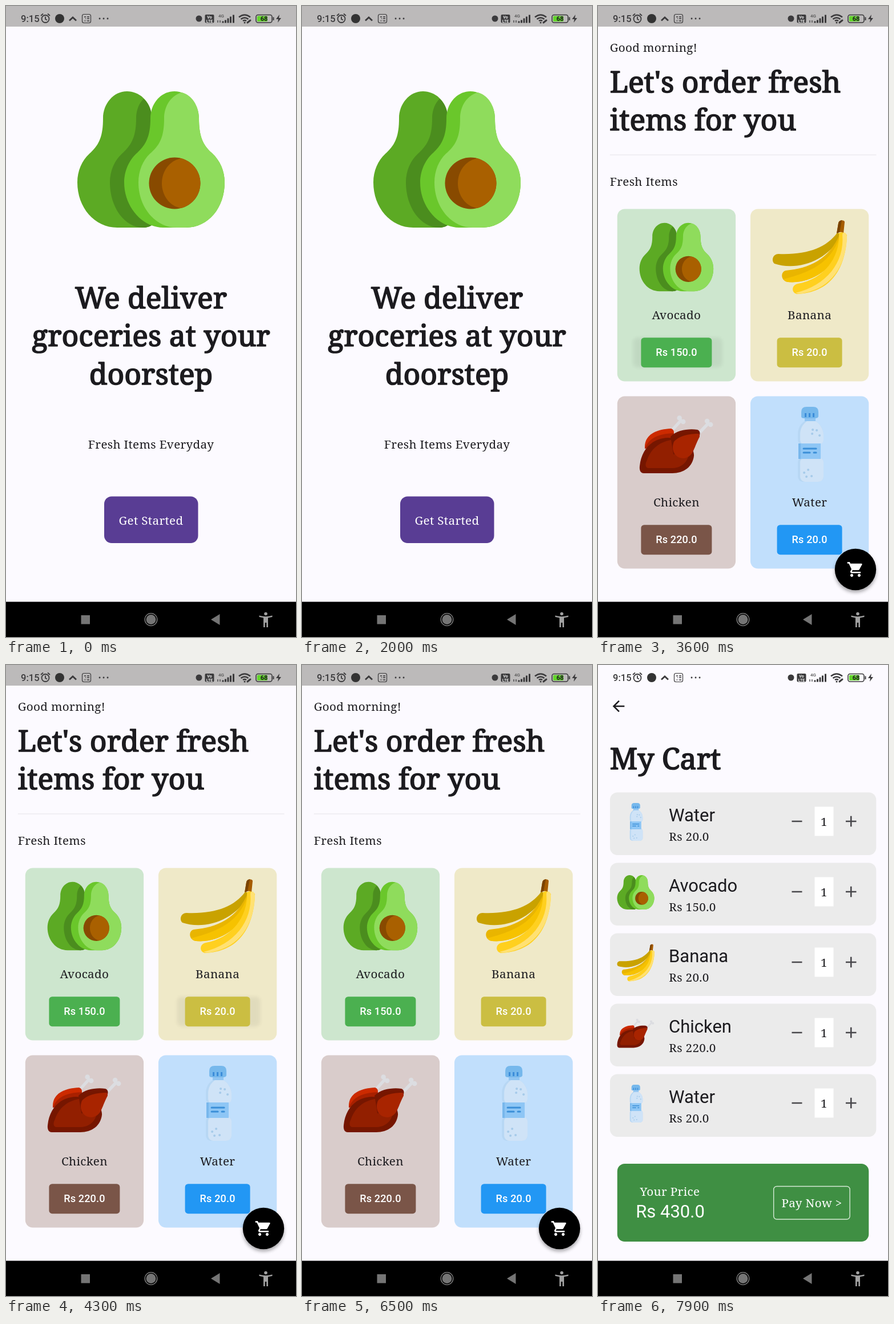
An HTML page that plays this animation: 508 by 1102 pixels, repeating every 8 s.

```html
<!DOCTYPE html>
<html lang="en">
<head>
<meta charset="utf-8">
<title>Grocery app</title>
<style>
  html, body { margin: 0; width: 100%; height: 100%; overflow: hidden; background: #fcfaff; }
  svg { display: block; width: 508px; height: 1102px; }
  text { fill: #1c1b1f; white-space: pre; }
  .head { font: 51.7px "Noto Serif", serif; stroke: #1c1b1f; stroke-width: 1.7; stroke-linejoin: round; }
  .body { font: 20.68px "Noto Serif", serif; letter-spacing: .32px; }
  .name { font: 31px Roboto, sans-serif; }
  .price { font: 500 18.1px Roboto, sans-serif; letter-spacing: .13px; }
  .tiny { font: 500 8px Roboto, sans-serif; }
  .light { fill: #fff; }
  .mid { text-anchor: middle; }
</style>
</head>
<body>
<svg id="stage" viewBox="0 0 508 1102">
  <defs>
    <filter id="soft" x="-20%" y="-20%" width="140%" height="140%"><feGaussianBlur stdDeviation="3"/></filter>

    <g id="avocado" transform="scale(.502) translate(-254 -268)">
      <path fill="#5caa24" d="M212 149C188 149 170 171 170 196C170 228 163 243 146 258C133 270 125 288 125 308C125 352 155 387 195 387H240C247 387 252 385 255 383V190C252 165 233 149 212 149Z"/>
      <path fill="#4b8d1e" d="M241 162C233 170 228 182 228 196C228 228 220 243 203 258C190 270 182 288 182 308C182 352 208 387 240 387C247 387 252 385 255 383V190C254 178 248 168 241 162Z"/>
      <path fill="#6ac72b" d="M295 149C271 149 253 171 253 196C253 228 245 243 228 258C216 269 207 288 207 308C207 352 240 387 275 387H315C355 387 383 352 383 308C383 288 375 270 361 257C345 243 338 228 338 196C338 171 319 149 295 149Z"/>
      <path fill="#8fdc5c" d="M308 151C289 156 277 175 277 196C277 228 270 243 252 258C240 269 232 288 232 308C232 352 262 387 299 387H315C355 387 383 352 383 308C383 288 375 270 361 257C345 243 338 228 338 196C338 174 325 155 308 151Z"/>
      <circle cx="295.5" cy="309.5" r="45" fill="#884a00"/>
      <path fill="#a96000" d="M307 266A45 45 0 0 1 307 353C286 350 273 330 273 309.5C273 289 286 270 307 266Z"/>
    </g>

    <g id="banana" transform="translate(-370.5 -438.5)">
      <path fill="#c9a200" d="M419 396C400 422 366 435 316 433C306 433 303 445 309 450C345 462 400 450 428 398Z"/>
      <path fill="#e9b500" d="M424 397C405 443 370 458 329 462C319 464 320 480 332 482C372 486 415 460 434 405Z"/>
      <path fill="#f6c200" d="M424 401C411 440 386 462 325 477C328 482 334 483 345 482C385 480 418 452 432 408Z"/>
      <path fill="#ffd01f" d="M422 397C424 440 395 477 350 485C339 487 338 500 348 503C405 501 434 462 436 400Q429 392 422 397Z"/>
      <path fill="#ffe173" d="M428 400C432 448 400 488 346 501Q352 504 362 501C408 492 434 455 436 404C436 394 428 393 428 400Z"/>
      <path fill="#a65c00" d="M418 397L421 379C422 373 431 373 432 377L430 396Q424 393 418 397Z"/>
      <path fill="#7a4300" d="M418 397L421 379Q422 375 427 374L423 395Z"/>
    </g>

    <g id="chicken" transform="translate(-137.3 -765.5)">
      <g stroke="#dcdde1" stroke-width="5.5" stroke-linecap="round">
        <path d="M125 746L145 724M172 751L193 729"/>
        <path stroke-width="8.5" d="M142.500 719.500h.1M149 726h.1M191 725h.1M197 731h.1"/>
      </g>
      <path fill="#cc2a00" d="M82 773C80 750 100 739 128 738Q135 740 132 750L118 765Z"/>
      <path fill="#a82000" d="M82 773C88 756 104 747 133 746L124 765Z"/>
      <path fill="#761600" d="M80 816C74 816 72 810 73 803C76 774 95 755 122 754C150 754 168 768 168 785C166 805 150 816 130 816Z"/>
      <path fill="#921f00" d="M89 807C83 807 82 801 85 795C92 774 106 761 132 757L159 784C155 800 143 807 129 807Z"/>
      <path fill="#761600" d="M127 752C138 740 160 738 174 740Q181 743 177 752L165 779L132 783Z"/>
      <path fill="#a82400" d="M177 747C164 747 143 749 133 761C127 775 134 790 150 790C168 787 167 772 178 752Z"/>
    </g>

    <g id="water" transform="translate(-370.5 -765.5)">
      <path fill="#76b8ec" d="M356 717V709Q356 700 365 700H377Q386 700 386 709V717Q385 720 380 720H361Q356 720 356 717Z"/>
      <path stroke="#3b8dd9" stroke-width="3" d="M363.500 711v7M370.500 711v7M377.500 711v7"/>
      <path fill="#90c5f2" d="M362 720H381V729H362Z"/>
      <path fill="#b7d7f4" d="M362 725C354 730 350 738 350 748V757Q350 765 357 765H387Q395 765 395 757V748C394 738 389 730 381 725Z"/>
      <path fill="#cfe3f7" d="M366 725C358 731 354 738 354 748V757Q354 765 361 765H387Q395 765 395 757V748C394 738 389 730 381 725Z"/>
      <rect x="350" y="788" width="45" height="43" rx="9" fill="#b7d7f4"/>
      <rect x="354" y="788" width="41" height="43" rx="9" fill="#cfe3f7"/>
      <path fill="#8ec6f5" d="M351 764H390V791H351Z"/>
      <path fill="#78b7ec" d="M351 764H355V791H351Z"/>
      <path stroke="#3b8fd8" stroke-width="3" stroke-linecap="round" d="M360 773h22M360 780h11M378 780h4"/>
      <path stroke="#a6cbea" stroke-width="4" stroke-linecap="round" d="M376 740h.1M383 741h.1M375 747h.1M388 750h.1M361 815h.1M368 810h.1M374 821h.1M365 822h.1"/>
    </g>
  </defs>

  <rect width="508" height="1102" fill="#fcfaff"/>
  <rect id="statusShade" width="508" height="36" fill="#bcbaba"/>
  <g id="intro"></g>
  <g id="home"></g>
  <g id="cart"></g>

  <g id="status" fill="none" stroke="#3b3a3c" stroke-width="1.8">
    <text x="26" y="28" font-family="Roboto, sans-serif" font-size="16.500" font-weight="500" stroke="none" style="fill:#3b3a3c">9:15</text>
    <circle cx="69" cy="22.500" r="6.500"/>
    <path d="M69 18.500v4.500l3 1.500M61 17l4-3.500M77 17l-4-3.500"/>
    <circle cx="94" cy="22" r="8" fill="#333" stroke="none"/>
    <path d="M111 25.500l6-5.500 6 5.500" stroke-width="2.800"/>
    <rect x="133.500" y="14.500" width="15" height="15" rx="3" stroke-width="1.200"/>
    <path d="M137 19h3M142 19h4M139 22h1M142 22h4M137 26h1M139 26h1M142 26h4" stroke-width="1.500"/>
    <path d="M164 22h.1M171 22h.1M178 22h.1" stroke-width="2.800" stroke-linecap="round"/>
    <circle cx="338" cy="22" r="5.500" fill="#3b3a3c" stroke="none"/>
    <rect x="348.500" y="15" width="16" height="14.500" rx="2" fill="#3b3a3c" stroke="none"/>
    <g stroke="none" font-family="Roboto, sans-serif" font-weight="700" text-anchor="middle">
      <text x="356.500" y="21.500" font-size="7" style="fill:#eee">Vo</text>
      <text x="356.500" y="28.500" font-size="7" style="fill:#eee">LTE</text>
      <text class="tiny" x="377" y="20" style="fill:#555">4G</text>
    </g>
    <path d="M371 25v4M375 25v4" stroke-width="1.300"/>
    <path d="M380 29.500v-3M384.500 29.500v-5M389 29.500v-8M393.500 29.500v-11M398.500 29.500v-14" stroke-width="3"/>
    <path d="M408 19.500q10-8 20 0M411.500 23q6.500-5 13 0M415 26q3-2 6 0" stroke-width="2.600"/>
    <path d="M418 29h.1M423 29l5-4" stroke-width="3" stroke-linecap="round"/>
    <rect x="438" y="15.500" width="28" height="13.500" rx="3.500" stroke-width="1.600"/>
    <rect x="440" y="17.500" width="18" height="9.500" rx="1.500" fill="#62d52a" stroke="none"/>
    <path d="M468.500 19.500v5.500" stroke-width="2"/>
    <text class="mid" x="452" y="26.300" font-family="Roboto, sans-serif" font-size="11" font-weight="700" stroke="none">68</text>
    <path d="M479 15l-6 8h4l-1 6 6-8h-4Z" fill="#3b3a3c" stroke="none"/>
  </g>

  <rect y="1040.500" width="508" height="62"/>
  <g fill="#757575">
    <rect x="131.500" y="1064" width="15.500" height="15.500"/>
    <circle cx="254" cy="1071.500" r="8.500"/>
    <circle cx="254" cy="1071.500" r="10.800" fill="none" stroke="#858585" stroke-width="1.300"/>
    <path d="M359 1071.500L374.500 1062V1081Z"/>
    <g fill="#a0a0a0">
      <circle cx="455" cy="1061.500" r="2.800"/>
      <path d="M443.500 1064.500Q455 1068 466.500 1064.500V1067L459 1068.500V1085H456.300V1077H453.700V1085H451V1068.500L443.500 1067Z"/>
    </g>
  </g>
</svg>

<script>
const LOOP = 8000, HOME_AT = 2100, ICONS_AT = 2200, CART_AT = 6600;
const $ = id => document.getElementById(id);

const text = (cls, x, y, s) => `<text class="${cls}" x="${x}" y="${y}">${s}</text>`;
const box = (x, y, w, h, r, fill, more = '') =>
  `<rect x="${x}" y="${y}" width="${w}" height="${h}" rx="${r}" fill="${fill}" ${more}/>`;
const icon = (name, x, y, scale) =>
  `<use href="#${name}" transform="translate(${x} ${y}) scale(${scale})"/>`;

const items = [
  { name: 'Avocado', price: '150.0', card: '#cde6ce', button: '#4bb050', tap: 3560 },
  { name: 'Banana',  price: '20.0',  card: '#efe9c8', button: '#cbbe42', tap: 4260 },
  { name: 'Chicken', price: '220.0', card: '#d9cccb', button: '#7a5548', tap: 4880 },
  { name: 'Water',   price: '20.0',  card: '#c1dffc', button: '#2297f4', tap: 5360 },
];

function introScreen() {
  const lines = ['We deliver', 'groceries at your', 'doorstep'];
  return icon('avocado', 254, 268, 1.992) +
    lines.map((s, i) => text('head mid', 254, 528 + i * 66.4, s)).join('') +
    text('body mid', 254, 773, 'Fresh Items Everyday') +
    box(172, 856.5, 164.5, 81.5, 13, '#593d94') +
    text('body mid light', 254, 905.5, 'Get Started');
}

function itemCard(item, i) {
  const x = 33.8 + (i % 2) * 233.2, y = 354.5 + (i >> 1) * 327, mid = x + 103.6;
  const w = item.price.length > 4 ? 124 : 114, left = mid - w / 2, top = y + 224.7;
  return box(x, y, 207.3, 301, 13, item.card) +
    `<g class="${i ? 'late' : ''}">${icon(item.name.toLowerCase(), mid, y + 84, 1)}</g>` +
    text('body mid', mid, y + 192.7, item.name) +
    box(left - 14, top, w + 32, 52, 8, '#000', 'class="press" filter="url(#soft)"') +
    box(left, top, w, 52, 5.5, item.button) +
    text('price mid light', mid, y + 256.8, 'Rs ' + item.price);
}

function homeScreen() {
  return text('body', 20.7, 80, 'Good morning!') +
    text('head', 20.7, 151, "Let's order fresh") +
    text('head', 20.7, 217, 'items for you') +
    box(21, 259.5, 466.5, 1, 0, '#e6e3e8') +
    text('body', 20.7, 314, 'Fresh Items') +
    items.map(itemCard).join('') +
    '<circle cx="451" cy="988" r="36" opacity=".35" filter="url(#soft)"/>' +
    '<circle id="fab" cx="451" cy="984" r="36.200"/>' +
    '<path fill="#fff" transform="translate(435.500 968.500) scale(1.293)" d="M7 18c-1.100 0-2 .9-2 2s.9 2 2 2 2-.9 2-2-.9-2-2-2zM1 2v2h2l3.600 7.600-1.350 2.450c-.16.28-.25.6-.25.95 0 1.100.9 2 2 2h12v-2H7.400c-.14 0-.25-.1-.25-.25l.95-1.750h7.450c.75 0 1.400-.4 1.750-1.030l3.580-6.490c.5-.8-.1-1.480-.88-1.480H5.200l-.94-2zm16 16c-1.100 0-2 .9-2 2s.9 2 2 2 2-.9 2-2-.9-2-2-2z"/>';
}

function cartRow(item, i) {
  const y = 222.5 + i * 123;
  return box(21, y, 466.3, 109.5, 13, '#ebebeb') +
    icon(item.name.toLowerCase(), 66, y + 51.5, .503) +
    text('name', 124, y + 50, item.name) +
    text('body', 124.3, y + 84, 'Rs ' + item.price) +
    box(379.5, y + 25, 33, 51, 0, '#fff') +
    text('body mid', 396, y + 58.5, '1') +
    `<path d="M339.500 ${y + 50.5}h18M434 ${y + 50.5}h18.500m-9.250-9.250v18.500" stroke="#48474b" stroke-width="2.600"/>`;
}

function cartScreen() {
  const [avocado, banana, chicken, water] = items;
  return '<path fill="#1c1b1f" transform="translate(20.500 56.500) scale(1.293)" d="M20 11H7.830l5.590-5.590L12 4l-8 8 8 8 1.410-1.410L7.830 13H20z"/>' +
    text('head', 20.7, 182, 'My Cart') +
    [water, avocado, banana, chicken, water].map(cartRow).join('') +
    box(33.8, 871, 440.5, 136, 13, '#3f8f43') +
    text('body mid light', 126, 926.5, 'Your Price') +
    text('name mid light', 126.5, 965, 'Rs 430.0') +
    box(307.7, 910.5, 133.5, 57.5, 5.5, 'none', 'stroke="#d5ead5" stroke-width="1.400"') +
    text('body light', 321.5, 947, 'Pay Now &gt;');
}

$('intro').innerHTML = introScreen();
$('home').innerHTML = homeScreen();
$('cart').innerHTML = cartScreen();
const late = document.querySelectorAll('.late'), presses = document.querySelectorAll('.press');

const show = (el, on) => { el.style.display = on ? '' : 'none'; };
const clamp = v => Math.max(0, Math.min(1, v));
const pulse = (t, start, length) => t < start ? 0 : clamp(1 - (t - start) / length);

function frame() {
  const t = performance.now() % LOOP;
  show($('intro'), t < HOME_AT);
  show($('home'), t >= HOME_AT && t < CART_AT);
  show($('cart'), t >= CART_AT);
  late.forEach(el => show(el, t >= ICONS_AT));
  presses.forEach((el, i) => el.setAttribute('opacity', .06 * pulse(t, items[i].tap, 400)));
  const glow = Math.round(36 * pulse(t, 6180, 220));
  $('fab').setAttribute('fill', `rgb(${glow},${glow},${glow})`);
  $('statusShade').setAttribute('opacity', 1 - clamp((t - CART_AT - 60) / 200));
  requestAnimationFrame(frame);
}
frame();
</script>
</body>
</html>
```
